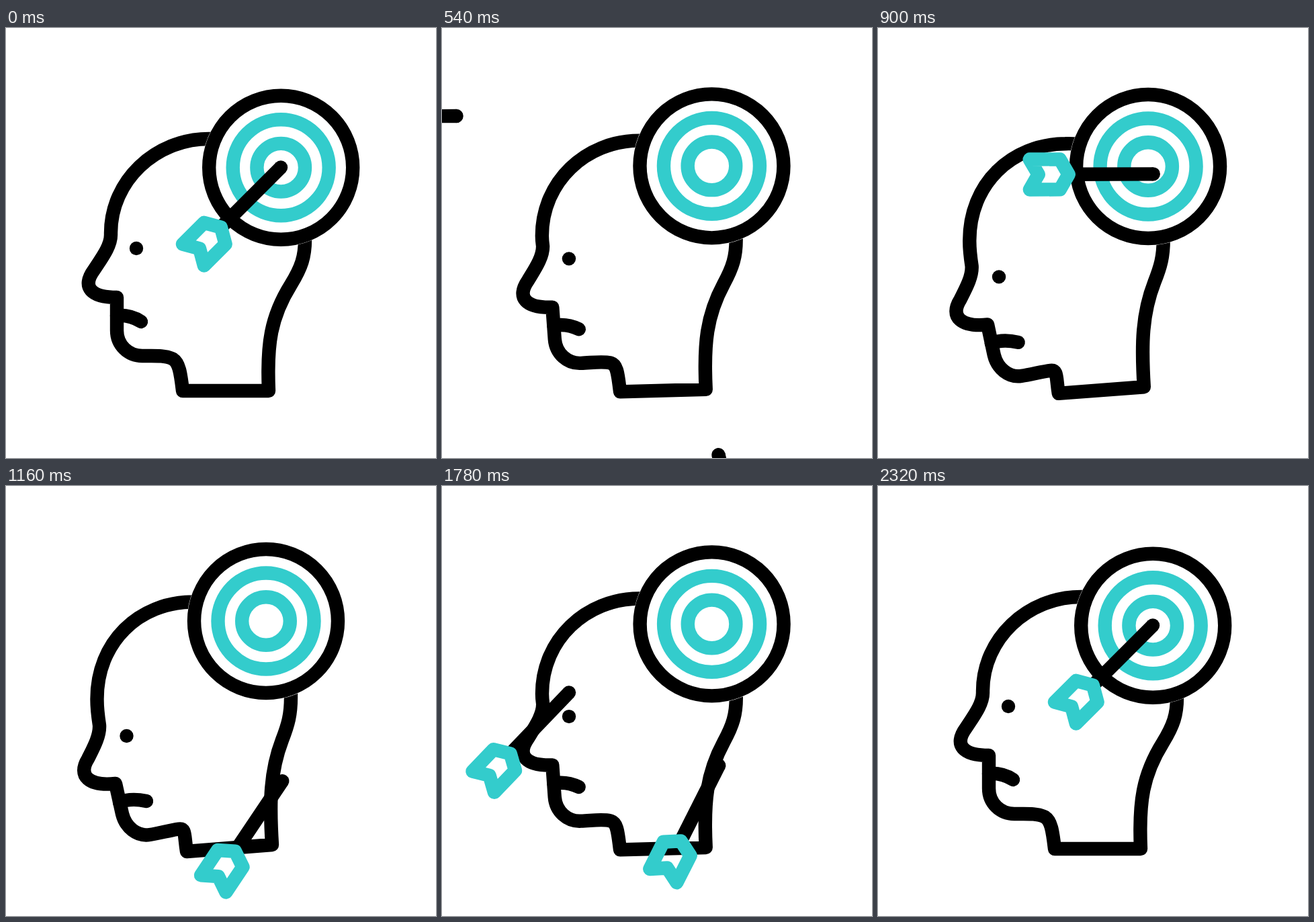
These frames come from a looping animation (640 by 640 pixels, 2.4 s). An HTML page:

```html
<!DOCTYPE html>
<html lang="en">
<head>
<meta charset="utf-8">
<title>Head and arrows</title>
<style>
  html, body { margin: 0; width: 100%; height: 100%; overflow: hidden; background: #fff; }
  svg { display: block; width: 100vw; height: 100vh; }
</style>
</head>
<body>
<svg viewBox="0 0 640 640" fill="none" stroke-width="20.4" stroke-linecap="round" stroke-linejoin="round">
  <defs>
    <g id="arrow">
      <path d="M0 0H-123" stroke="#000" stroke-linecap="butt"/>
      <circle r="10.2" fill="#000" stroke="none"/>
      <path d="M-184 -22.5H-139L-126 0L-139 22.5H-184L-171 0Z" stroke="#3cc"/>
    </g>
  </defs>
  <g stroke="#000">
    <path id="head"/>
    <path id="mouth"/>
  </g>
  <circle id="eye" r="10.2" fill="#000"/>
  <g id="board">
    <circle r="117.6" fill="#fff"/>
    <circle r="107" stroke="#000"/>
    <circle r="71.5" stroke="#3cc"/>
    <circle r="35.8" stroke="#3cc"/>
  </g>
  <use href="#arrow" class="shot"/>
  <use href="#arrow" class="shot"/>
  <use href="#arrow" class="shot"/>
</svg>
<script>
const LOOP = 2400, HALF = 1160;
const $ = id => document.getElementById(id);
const lerp = (a, b, k) => a + (b - a) * k;
const clamp = k => Math.min(1, Math.max(0, k));

// Upright and tilted outlines share the same commands.
const headUp = `M340 170 C326 166 314 165 302 165 C222 165 156 228 156 305
  C156 306 156 307 156 308 C156 325 142 343 131 360 C112 386 127 401 165 401
  L165 450 C165 472 182 488 203 488 C222 488 236 487 247 492 C258 497 260 515 263 540
  L391 540 C388 470 394 430 424 382 C440 356 445 340 445 315 L445 290`;
const headDown = `M310 176 C300 173 290 172 278 172.5 C198 173 135 232 135.5 318
  C135.5 331 137 343 139 356 C140 372 130 390 122 406 C106 432 124 447 163 443
  L173 488 C178 508 195 522 214 519 C228 517 245 512 257 510.5 C268 509 265 520 269 544
  L396 534 C392 470 393 425 411 378 C420 355 424 340 424 315 L424 290`;
const mouthUp = "M165 428 C178 427 190 430 201 437";
const mouthDown = "M169 471 C180 466 195 466 209 469";

function morph(a, b, k) {
  const ends = b.match(/[\d.]+/g);
  let i = 0;
  return a.replace(/[\d.]+/g, n => lerp(+n, +ends[i++], k).toFixed(2));
}

// Ease with timing handles at 0.8 and 0.2.
function ease(x) {
  let lo = 0, hi = 1;
  for (let i = 0; i < 24; i++) {
    const s = (lo + hi) / 2, r = 1 - s;
    if (2.4 * r * r * s + 0.6 * r * s * s + s * s * s < x) lo = s; else hi = s;
  }
  return lo * lo * (3 - 2 * lo);
}

// path: flight of the tip; push: knock on the board; turn: angles at launch, hit and rest
const shots = [
  { start: 500, hit: 850, fall: 880, path: [[-27, 134], [180, 115], [388.6, 201.3]],
    push: [21, 7], turn: [3, -20, 0], spin: 0.215 },
  { start: 1180, hit: 1470, fall: 1500, path: [[-60, 360], [188, 278], [389, 193]],
    push: [21.5, -8], turn: [18, 26, 28], spin: 0.135 },
  { start: 1600, hit: 2090, fall: 2524, path: [[-40, 470], [320, 198], [409, 207.5]],
    push: [20, -15], turn: [51, 38, 45], spin: 0.14 }
];

function knock(d) {
  if (d <= 0) return 0;
  return d < 30 ? d / 30 : (1 - clamp((d - 30) / 120)) ** 2;
}

function shotPose(s, t) {
  if (t < s.hit) {
    const u = (t - s.start) / (s.hit - s.start), r = 1 - u;
    const at = i => r * r * s.path[0][i] + 2 * r * u * s.path[1][i] + u * u * s.path[2][i];
    return [at(0), at(1), lerp(s.turn[0], s.turn[1], u)];
  }
  const k = knock(Math.min(t, s.fall) - s.hit);
  const d = Math.max(0, t - s.fall);
  const spinTime = Math.max(0, t - Math.max(s.fall, s.hit + 50));
  return [
    s.path[2][0] + s.push[0] * k + d * 0.006,
    s.path[2][1] + s.push[1] * k + 0.4 * d + 0.0015 * d * d,
    lerp(s.turn[1], s.turn[2], clamp((t - s.hit) / 50)) + s.spin * spinTime
  ];
}

const place = (el, x, y, more = "") =>
  el.setAttribute("transform", `translate(${x.toFixed(2)} ${y.toFixed(2)})${more}`);
const arrows = document.querySelectorAll(".shot");

function draw(t) {
  const tilt = t < HALF ? ease(t / HALF) : 1 - ease(clamp((t - HALF) / HALF));
  $("head").setAttribute("d", morph(headUp, headDown, tilt));
  $("mouth").setAttribute("d", morph(mouthUp, mouthDown, tilt));
  place($("eye"), lerp(194, 179.5, tilt), lerp(328, 372, tilt));

  let x = lerp(409.2, 387, tilt), y = lerp(207.7, 201, tilt);
  shots.forEach((s, i) => {
    const k = knock(t - s.hit);
    x += s.push[0] * k;
    y += s.push[1] * k;
    const [ax, ay, turn] = shotPose(s, t < s.start ? t + LOOP : t);
    arrows[i].style.display = ay > 860 ? "none" : "";
    place(arrows[i], ax, ay, ` rotate(${(-turn).toFixed(2)})`);
  });
  place($("board"), x, y);
}

const began = performance.now();
function tick() {
  draw((performance.now() - began) % LOOP);
  requestAnimationFrame(tick);
}
draw(0);
requestAnimationFrame(tick);
</script>
</body>
</html>
```
